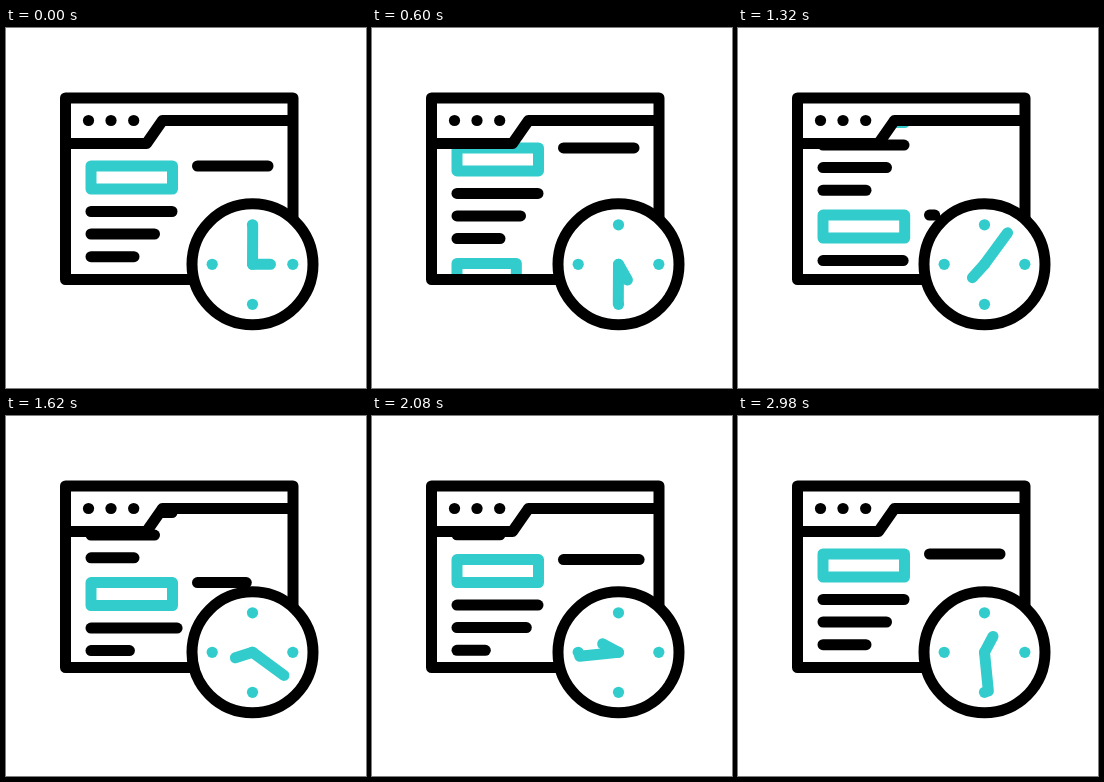
Write an HTML page that moves like this. It is 360 px wide and 360 px high and loops after 3000 ms.

```html
<!DOCTYPE html>
<html lang="en">
<head>
<meta charset="utf-8">
<title>Page and clock</title>
<style>
  html, body { margin: 0; width: 100%; height: 100%; overflow: hidden; background: #fff; }
  svg { display: block; width: 100vw; height: 100vh; }
  .ink, .teal { fill: none; stroke-width: 11; stroke-linecap: round; stroke-linejoin: round; }
  .ink { stroke: #000; }
  .teal { stroke: #3cc; }
  .dots { fill: #3cc; }
</style>
</head>
<body>
<svg viewBox="0 0 360 360">
  <clipPath id="page"><path d="M60 115.5H140.5L156.5 92.5H287V251.5H60Z"/></clipPath>
  <g clip-path="url(#page)"><g id="scroll"></g></g>

  <path class="ink" d="M59.5 70H287V251.5H59.5ZM59.5 115.5H140.5L156.5 92.5H287"/>
  <circle cx="82.5" cy="92.5" r="5.6"/>
  <circle cx="105" cy="92.5" r="5.6"/>
  <circle cx="127.7" cy="92.5" r="5.6"/>

  <g transform="translate(246.5 236.3)">
    <circle class="ink" r="60.5" style="fill:#fff"/>
    <g class="dots">
      <circle cy="-39.5" r="5.6"/>
      <circle cx="40.3" r="5.6"/>
      <circle cy="40" r="5.6"/>
      <circle cx="-40.3" r="5.6"/>
    </g>
    <path id="minute" class="teal" d="M0 0V-39"/>
    <path id="hour" class="teal" d="M0 0V-18"/>
  </g>
</svg>
<script>
  const LOOP = 3000, SCROLL_TIME = 2400, PAGE = 115.5;
  const GROW = 700, SETTLE = 500, EXTRA = 7;

  // x, y, full width, start of growth, optional box height
  const items = [
    { x: 85, y: 138, w: 81.5, start: 170, h: 23 },
    { x: 85, y: 183.5, w: 81, start: 750 },
    { x: 85, y: 206, w: 63.5, start: 1250 },
    { x: 85, y: 228.7, w: 43, start: 1700 },
    { x: 191.5, y: 138, w: 70.5, start: 1210 }
  ];

  const byId = id => document.getElementById(id);
  const scroll = byId('scroll'), minute = byId('minute'), hour = byId('hour');

  const ease = u => {
    u = Math.min(1, Math.max(0, u));
    return u * u * (3 - 2 * u);
  };

  function shape({ x, y, h }, w, dy) {
    const top = `M${x} ${y + dy}h${w}`;
    return h ? `${top}v${h}h${-w}Z` : top;
  }

  function addPath(item) {
    const path = document.createElementNS('http://www.w3.org/2000/svg', 'path');
    path.setAttribute('class', item.h ? 'teal' : 'ink');
    scroll.append(path);
    return path;
  }

  for (const item of items) {
    addPath(item).setAttribute('d', shape(item, item.w, 0));
    item.next = addPath(item);
  }

  // Grow past the full width, then settle back.
  function widthAt({ w, start }, t) {
    const age = t - start;
    return (w + EXTRA) * ease(age / GROW) - EXTRA * ease((age - GROW) / SETTLE);
  }

  function draw(now) {
    const t = now % LOOP;
    scroll.setAttribute('transform', `translate(0 ${-PAGE * ease(t / SCROLL_TIME)})`);
    for (const item of items) {
      const w = widthAt(item, t);
      item.next.setAttribute('d', w > 0 ? shape(item, w, PAGE) : '');
    }
    minute.setAttribute('transform', `rotate(${t * 0.3})`);
    hour.setAttribute('transform', `rotate(${90 + t * 0.1})`);
  }

  function tick() {
    draw(performance.now());
    requestAnimationFrame(tick);
  }
  draw(0);
  requestAnimationFrame(tick);
</script>
</body>
</html>
```
